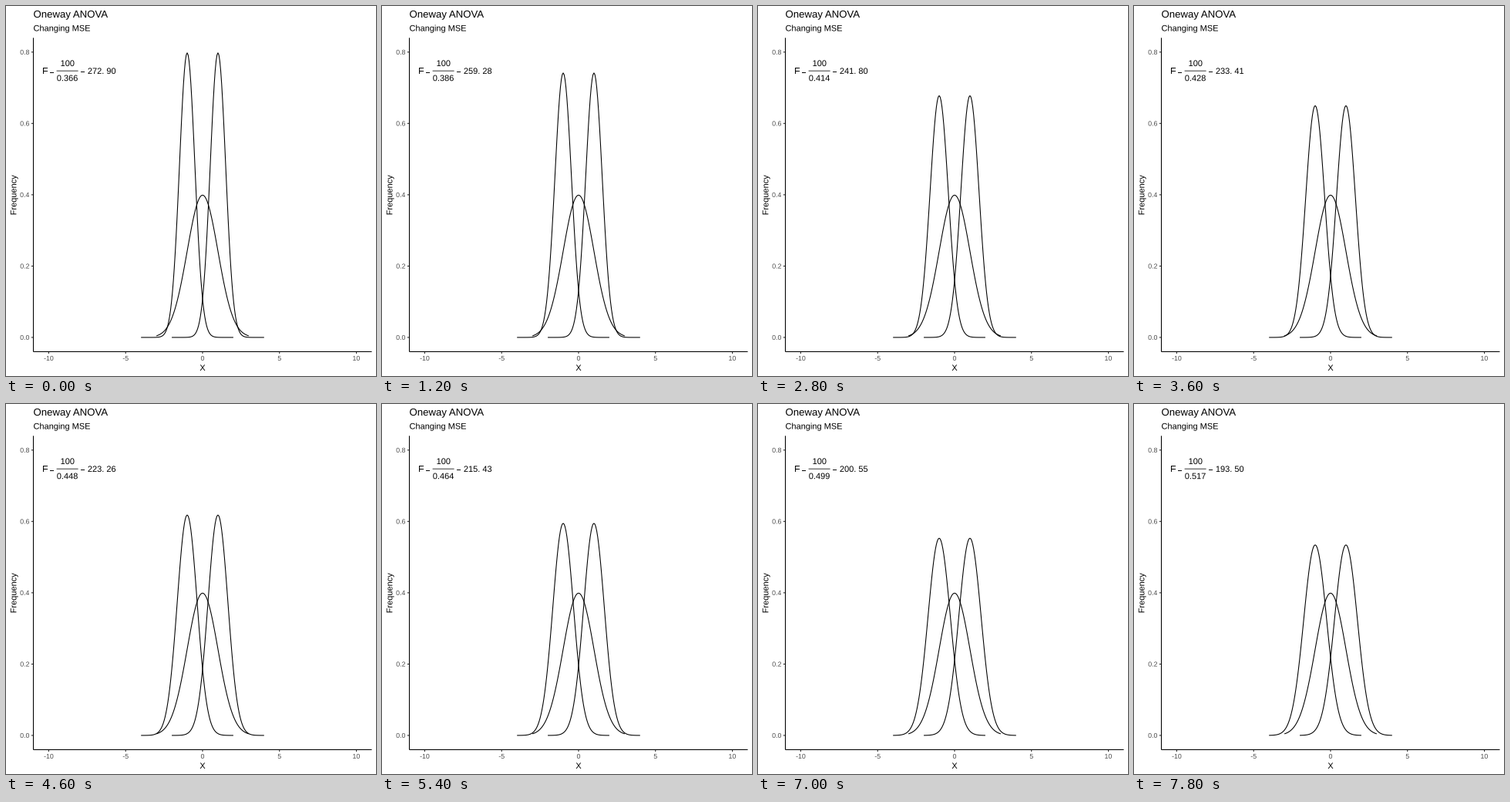
A matplotlib script for the animation above (8000 ms loop, 480 px wide and 480 px high).

```python
import numpy as np
import matplotlib.pyplot as plt
from matplotlib.animation import FuncAnimation
from matplotlib.patches import PathPatch
from matplotlib.textpath import TextPath
from matplotlib.transforms import Affine2D

SIZE, DPI = 480, 72
FRAMES, INTERVAL = 40, 200
LINE = 1.07
LEFT, RIGHT, TOP, BOTTOM = 35.5, 474.5, 41.3, 448.45

plt.rcParams["font.family"] = "Liberation Sans"

fig = plt.figure(figsize=(SIZE / DPI, SIZE / DPI), dpi=DPI, facecolor="white")
ax = fig.add_axes([0, 0, 1, 1])
ax.set_xlim(0, SIZE)
ax.set_ylim(SIZE, 0)
ax.axis("off")


def px(x):
    return LEFT + (x + 11) / 22 * (RIGHT - LEFT)


def py(y):
    return BOTTOM - (y + 0.04) / 0.88 * (BOTTOM - TOP)


def label(x, y, text, size=11, color="black", align=0, angle=0):
    """Text outline on a sub-pixel baseline; align 0 left, 0.5 centre, 1 right."""
    path = TextPath((0, 0), text, size=size)
    box = path.get_extents()
    shift = -align * (box.x0 + box.x1)
    place = (Affine2D().translate(shift, 0).scale(1, -1)
             .rotate_deg(-angle).translate(x, y))
    return ax.add_patch(PathPatch(path, fc=color, lw=0,
                                  transform=place + ax.transData))


def stroke(xs, ys, color="black"):
    return ax.plot(xs, ys, color=color, lw=LINE, snap=False,
                   solid_capstyle="butt", solid_joinstyle="round")[0]


def bell(mean, sd):
    x = np.linspace(mean - 3, mean + 3, 101)
    y = np.exp(-((x - mean) / sd) ** 2 / 2) / (sd * np.sqrt(2 * np.pi))
    return px(x), py(y)


def draw_axes():
    for x in (-10, -5, 0, 5, 10):
        stroke([px(x)] * 2, [BOTTOM, BOTTOM + 2.75], "#333333")
        label(px(x), 460, str(x), 8.8, "#4d4d4d", 0.5)
    for y in (0, 0.2, 0.4, 0.6, 0.8):
        stroke([LEFT - 2.75, LEFT], [py(y)] * 2, "#333333")
        label(30.4, py(y) + 3.1, f"{y:.1f}", 8.8, "#4d4d4d", 1)
    stroke([LEFT, LEFT], [TOP, BOTTOM])
    stroke([LEFT, RIGHT], [BOTTOM, BOTTOM])
    label(35.5, 15, "Oneway ANOVA", 13.2)
    label(35.5, 32.5, "Changing MSE")
    label(px(0), 473, "X", align=0.5)
    label(13.4, (TOP + BOTTOM) / 2, "Frequency", align=0.5, angle=90)


draw_axes()
stroke(*bell(0, 1))
groups = [(mean, stroke([], [])) for mean in (-1, 1)]

# F = 100 / MSE = value
label(47.5, 88, "F")
label(57, 88.5, "=", 10)
label(70.6, 78, "100")
stroke([65.6, 93.6], [84.2, 84.2], "#444444")
mse_text = label(65.8, 97.2, "0")
label(96.6, 88, "=")
f_text = label(105.9, 88, "0")


def update(i):
    sd = 0.5 + i / 158
    f = 409.354 / (1 + 2 * sd ** 2)
    for mean, line in groups:
        line.set_data(*bell(mean, sd))
    value = f"{f:.2f}".replace(".", ". ")
    for patch, text in ((mse_text, f"{100 / f:.3f}"), (f_text, value)):
        patch.set_path(TextPath((0, 0), text, size=11))
    return [line for _, line in groups] + [mse_text, f_text]


anim = FuncAnimation(fig, update, frames=FRAMES, interval=INTERVAL,
                     repeat=True, repeat_delay=0, blit=False)
plt.show()
```
